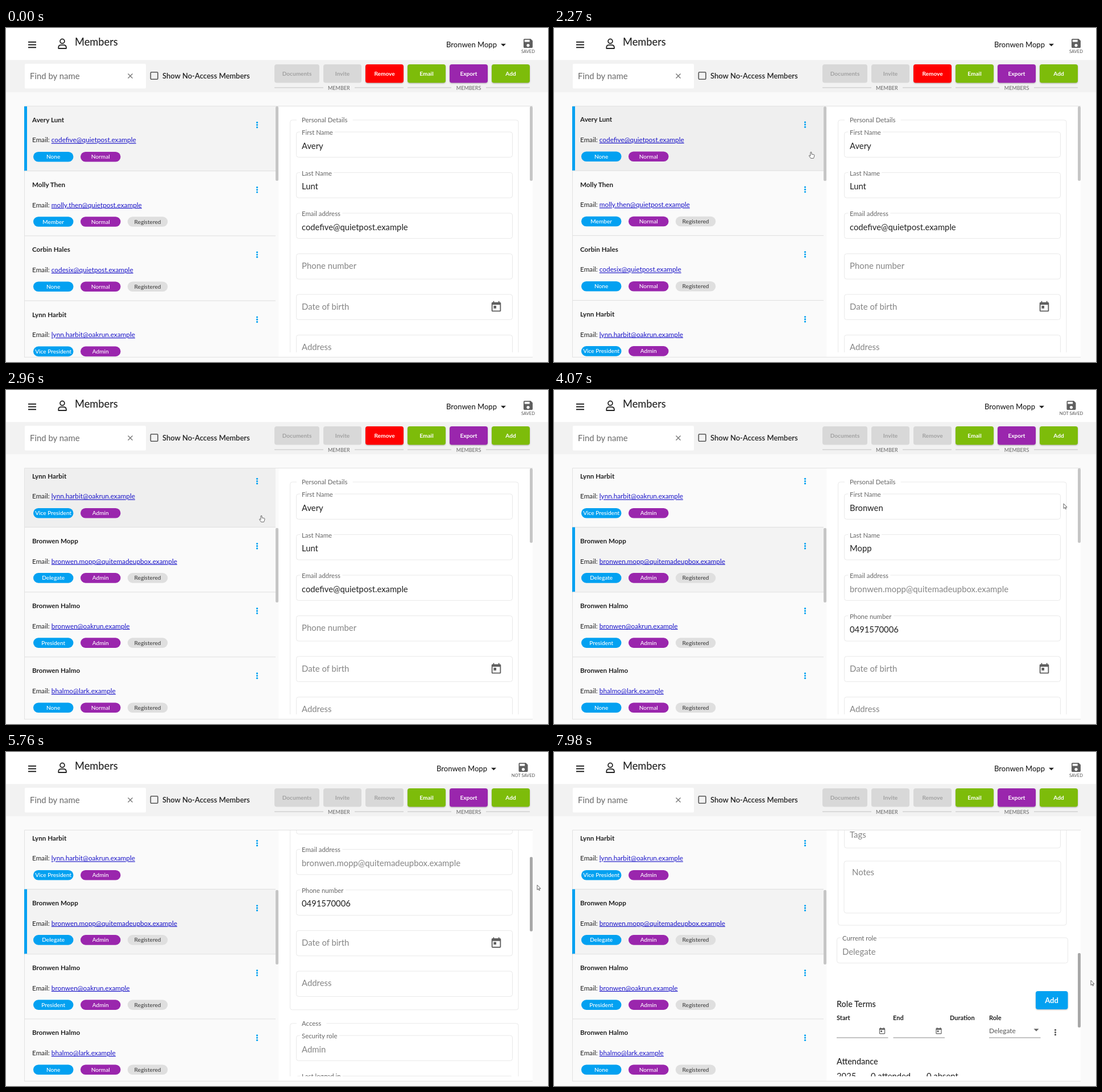
An HTML page for the animation above (8000 ms loop, 953 by 588 pixels).

```html
<!DOCTYPE html>
<html lang="en">
<head>
<meta charset="utf-8">
<title>Members</title>
<style>
html, body { margin: 0; width: 100%; height: 100%; overflow: hidden; background: #fafafa; }
svg { display: block; font-family: Lato, "Open Sans", sans-serif; }
text { fill: #222; white-space: pre; }
.title { font-size: 18.2px; font-weight: 500; }
.user { font-size: 13px; font-weight: 500; }
.check { font-size: 13px; font-weight: 600; }
.btn { font-size: 10.1px; font-weight: 700; text-anchor: middle; }
.caps { font-size: 9px; text-anchor: middle; fill: #666; }
.save { font-size: 7.5px; text-anchor: middle; fill: #555; }
.name { font-size: 11.7px; font-weight: 700; }
.mail { font-size: 11.8px; }
.link { fill: #1a14c8; text-decoration: underline; }
.chip { font-size: 10.1px; font-weight: 500; text-anchor: middle; fill: #fff; }
.value { font-size: 14.8px; }
.hint { font-size: 14.9px; fill: #858585; }
.label, .legend { font-size: 11.4px; fill: #666; stroke: #fff; paint-order: stroke; stroke-linejoin: round; }
.label { stroke-width: 8px; }
.legend { stroke-width: 20px; }
.head { font-size: 14.4px; font-weight: 500; }
.col { font-size: 11px; font-weight: 700; }
.cell { font-size: 11.9px; fill: #555; }
.box { fill: #fff; stroke: #e9e9e9; }
.raised { filter: drop-shadow(0 1px .8px #0004); }
#cursor path { fill: #fff; stroke: #555; stroke-width: .9; stroke-linejoin: round; }
#cursor .beam { fill: none; }
</style>
</head>
<body>
<svg id="stage" width="953" height="588" viewBox="0 0 953 588"></svg>
<script>
const BLUE = '#03a1f1', PURPLE = '#9a26ad', GREEN = '#7dbc0a', GREY = '#d8d8d8', RED = '#ff0000';
const LOOP = 8000, TOP = 137.3, PITCH = 114.2, LIST_SCROLL = 352.7, PICK = 3720, SAVE = 6300;

const text = (x, y, s, cls, style = '') => `<text x="${x}" y="${y}" class="${cls}" style="${style}">${s}</text>`;
const rect = (x, y, w, h, fill, more = '') => `<rect x="${x}" y="${y}" width="${w}" height="${h}" fill="${fill}" ${more}/>`;
const path = (d, stroke, w = 1, more = '') => `<path d="${d}" fill="none" stroke="${stroke}" stroke-width="${w}" ${more}/>`;
const line = (x1, x2, y, stroke = '#dedede') => path(`M${x1} ${y}H${x2}`, stroke);
const caret = (x, y, fill) => `<path d="M${x - 4.5} ${y - 2.3}h9l-4.5 4.6z" fill="${fill}"/>`;
const dots = (x, y, gap, fill) => [-gap, 0, gap].map(d => `<circle cx="${x}" cy="${y + d}" r="1.6" fill="${fill}"/>`).join('');
const icon = (x, y, k, d) => `<path transform="translate(${x} ${y}) scale(${k}) translate(-12 -11.5)" fill="#5f5f5f" d="${d}"/>`;

const FLOPPY = 'M17 3H5c-1.1 0-2 .9-2 2v14c0 1.1.9 2 2 2h14c1.1 0 2-.9 2-2V7zM12 19c-1.7 0-3-1.3-3-3s1.3-3 3-3 3 1.3 3 3-1.3 3-3 3zm3-10H5V5h10z';
const CALENDAR = 'M19 3h-1V1h-2v2H8V1H6v2H5c-1.1 0-2 .9-2 2v14c0 1.1.9 2 2 2h14c1.1 0 2-.9 2-2V5c0-1.1-.9-2-2-2zm0 16H5V8h14zM7 10h5v5H7z';

const members = [
  ['Avery Lunt', 'codefive@quietpost.example', 'None', 'Normal'],
  ['Molly Then', 'molly.then@quietpost.example', 'Member', 'Normal', 1],
  ['Corbin Hales', 'codesix@quietpost.example', 'None', 'Normal', 1],
  ['Lynn Harbit', 'lynn.harbit@oakrun.example', 'Vice President', 'Admin'],
  ['Bronwen Mopp', 'bronwen.mopp@quitemadeupbox.example', 'Delegate', 'Admin', 1],
  ['Bronwen Halmo', 'bronwen@oakrun.example', 'President', 'Admin', 1],
  ['Bronwen Halmo', 'bhalmo@lark.example', 'None', 'Normal', 1]
];

function button(x, w, s, fill, id = '') {
  const off = fill === GREY;
  return `<g id="${id}">` + rect(x, 64, w, 32.5, fill, `rx="4" class="${off ? '' : 'raised'}"`) +
    text(x + w / 2, 84, s, 'btn', `fill:${off ? '#a2a2a2' : '#fff'}`) + '</g>';
}

function chip(x, s, fill, ink = '#fff') {
  return rect(x, 80.7, 70.5, 17.6, fill, 'rx="8.8"') + text(x + 35.2, 93, s, 'chip', `fill:${ink}`);
}

function row([name, mail, role, access, registered], i) {
  return `<g class="row" transform="translate(0 ${TOP + PITCH * i})">` +
    rect(33, 0, 441, PITCH, '#fafafa') + line(33, 474, .2) + rect(32, .2, 5, PITCH - .2, BLUE) +
    text(46, 28.7, name, 'name') +
    text(46, 64.2, `Email: <tspan class="link">${mail}</tspan>`, 'mail') +
    chip(48, role, BLUE) + chip(131, access, PURPLE) +
    (registered ? chip(213.8, 'Registered', '#dfdfdf', '#444') : '') +
    dots(441.5, 33.3, 4.2, BLUE) + '</g>';
}

// An outlined input; without a value the label is shown as a placeholder.
function field(y, label, value, grey, x = 510, w = 380, cls = '') {
  return rect(x + .5, y, w, 44.5, '#fff', `rx="4" class="box ${cls}"`) + (value
    ? text(x + 10, y + 5, label, 'label') + text(x + 10, y + 29.5, value, grey ? 'hint' : 'value')
    : text(x + 10, y + 26.5, label, 'hint'));
}

const group = (y, end, s) => rect(499.5, y, 401.5, end - y, '#fff', 'rx="4" class="box"') + text(520, y + 4, s, 'legend');

function details(id, first, last, mail, greyMail, phone) {
  return `<g id="${id}">` + field(183, 'First Name', first, 0, 510, 380, 'first') + field(254.5, 'Last Name', last) +
    field(326, 'Email address', mail, greyMail) + field(397.5, 'Phone number', phone) + '</g>';
}

const form =
  group(162, 608.5, 'Personal Details') +
  details('before', 'Avery', 'Lunt', members[0][1], 0, '') +
  details('after', 'Bronwen', 'Mopp', members[4][1], 1, '0491570006') +
  field(469, 'Date of birth') + icon(862, 490.5, .92, CALENDAR) + field(540.5, 'Address') +
  group(632.5, 792.5, 'Access') + field(653.7, 'Security role', 'Admin', 1) +
  field(725, 'Last logged in', '4 Jun 2025 3:22 PM', 1) +
  group(817, 1019, 'Other') + field(838.5, 'Tags') +
  rect(510, 906, 381, 91.5, '#fff', 'rx="4" class="box"') + text(524, 930.5, 'Notes', 'hint') +
  field(1041, 'Current role', 'Delegate', 1, 497, 406) +
  text(497, 1163, 'Role Terms', 'head') +
  rect(847, 1135, 56.5, 32, BLUE, 'rx="4" class="raised"') +
  text(875, 1155.5, 'Add', 'btn', 'fill:#fff;font-size:13px') +
  [[497, 'Start'], [596, 'End'], [696, 'Duration'], [765, 'Role']].map(([x, s]) => text(x, 1186, s, 'col')).join('') +
  [497, 596.5, 765].map(x => line(x, x + 90.5, 1217, '#888')).join('') +
  icon(577, 1205, .57, CALENDAR) + icon(676.5, 1205, .57, CALENDAR) +
  text(765, 1208.5, 'Delegate', 'cell') + caret(848, 1203.5, '#666') + dots(881.5, 1207.5, 4.2, '#555') +
  text(497, 1264, 'Attendance', 'head') +
  [[497, '2025'], [557, '0 attended'], [655, '0 absent']].map(([x, s]) => text(x, 1290, s, 'value')).join('');

const $ = id => document.getElementById(id);
$('stage').innerHTML =
  `<clipPath id="listClip">${rect(32, 138, 442, 441)}</clipPath>
   <clipPath id="formClip">${rect(480, 138, 441, 433)}</clipPath>` +
  rect(0, 0, 953, 588, '#fafafa') + rect(0, 0, 953, 56.5, '#fff') + rect(0, 56.5, 953, 56.5, '#f2f2f2') +
  path('M39 24.8h14M39 29.5h14M39 34.2h14', '#222', 2) +
  `<circle cx="99" cy="23.3" r="3.9" fill="none" stroke="#222" stroke-width="1.8"/>` +
  path('M92.3 36v-1.8c0-3.2 2.2-4.4 5-4.4h3.6c2.8 0 5 1.2 5 4.4V36z', '#222', 1.8, 'stroke-linejoin="round"') +
  text(121, 31, 'Members', 'title') +
  '<g id="user">' + text(863, 34, 'Bronwen Mopp', 'user', 'text-anchor:end') + caret(874.5, 30, '#222') + '</g>' +
  '<g id="save">' + icon(918, 26.6, .89, FLOPPY) + text(918, 44.3, '', 'save') + '</g>' +
  rect(33, 63, 213, 43.5, '#fff', 'rx="2"') + text(42, 89.5, 'Find by name', 'hint', 'fill:#6a6a6a') +
  path('M214.5 80.5l8 8m0-8l-8 8', '#777', 1.4) +
  rect(254.3, 77.7, 12.6, 12.6, 'none', 'rx="1.5" stroke="#555" stroke-width="1.6"') +
  text(275, 89, 'Show No-Access Members', 'check') +
  button(472, 79, 'Documents', GREY) + button(558, 67, 'Invite', GREY) +
  button(632, 67, 'Remove', RED, 'remove') + button(632, 67, 'Remove', GREY, 'removeOff') +
  button(706, 67, 'Email', GREEN) + button(780, 67, 'Export', PURPLE) + button(854, 67, 'Add', GREEN) +
  [[472, 558], [613, 699], [706, 783], [844, 921]].map(([a, b]) => line(a, b, 105, '#c2c2c2')).join('') +
  text(585.3, 108.6, 'MEMBER', 'caps') + text(813.6, 108.6, 'MEMBERS', 'caps') +
  rect(479.5, 138, 446.5, 441.5, '#fff') +
  path('M32.5 579.5V137.5H926M32 579.5H926', '#e2e2e2') +
  `<g clip-path="url(#listClip)"><g id="list">${members.map(row).join('')}</g></g>` +
  `<g clip-path="url(#formClip)"><g id="form">${form}</g></g>` +
  rect(474, 138, 5, 131, '#c6c6c6', 'rx="2" id="listThumb"') +
  rect(921, 138, 5, 131, '#c6c6c6', 'rx="2" id="formThumb"') +
  `<g id="cursor">
    <path class="arrow" d="M0 0V8.6L2 6.8 3.4 9.8 4.6 9.2 3.3 6.3H6Z"/>
    <path class="hand" d="M-1 .8Q0-.6 1 .8V4L5 4.8Q6 5 6 6.2L5.2 9.5 4.4 11.3H-.4L-3.4 7.2Q-3.6 5.8-2.4 6.2L-1 7.2Z"/>
    <path class="beam" d="M-2-5.5H2M0-5.5V5.5M-2 5.5H2"/>
  </g>`;

const rows = [...document.querySelectorAll('.row')];
const firstBoxes = document.querySelectorAll('.first');
const pointers = ['arrow', 'hand', 'beam'].map(c => document.querySelector('#cursor .' + c));

// Pointer keys: time, x, y, form scroll.
const keys = [
  [1070, 760, 206, 0], [1320, 700, 208, 0], [1480, 700, 208, 0], [1790, 464, 206, 0], [1940, 464, 206, 0],
  [2250, 452, 218, 0], [2960, 449, 221, 0], [3100, 449, 221, 0], [3550, 446, 300, 0], [3680, 446, 300, 0],
  [4060, 896, 200, 0], [4200, 896, 200, 0], [4300, 935, 186, 0], [4440, 935, 186, 0], [4630, 925, 185, 0],
  [4780, 925, 184, 0], [5110, 925, 184, 0], [5760, 934, 234, 154.4], [6950, 946, 310, 410], [7980, 944, 402, 714]
];

function pose(t) {
  if (t <= keys[0][0]) return keys[0].slice(1);
  const i = keys.findIndex(k => k[0] > t);
  if (i < 0) return keys[keys.length - 1].slice(1);
  const a = keys[i - 1], b = keys[i], u = (t - a[0]) / (b[0] - a[0]);
  return [1, 2, 3].map(n => a[n] + (b[n] - a[n]) * u);
}

function smooth(t, from, to) {
  const u = Math.min(1, Math.max(0, (t - from) / (to - from)));
  return u * u * (3 - 2 * u);
}

const show = (el, on) => el.style.display = on ? '' : 'none';
const move = (id, x, y) => $(id).setAttribute('transform', `translate(${x} ${y})`);

function draw(t) {
  const [x, y, formScroll] = pose(t);
  const listScroll = LIST_SCROLL * smooth(t, 2257, 2890);
  const visible = t >= keys[0][0], picked = t >= PICK, unsaved = picked && t < SAVE;
  const overList = visible && x < 474;
  const overFirst = visible && x > 510 && x < 890 && y > 183 && y < 227;
  const hovered = overList ? Math.floor((y - TOP + listScroll) / PITCH) : -1;
  const selected = picked ? 4 : 0;

  move('list', 0, -listScroll);
  move('form', 0, -formScroll);
  move('listThumb', 0, listScroll * .298);
  move('formThumb', 0, formScroll * .3025);
  $('formThumb').setAttribute('fill', t >= 4460 ? '#a8a8a8' : '#c6c6c6');

  rows.forEach((r, i) => {
    const [back, bar] = r.querySelectorAll('rect');
    back.setAttribute('fill', i === hovered ? '#efefef' : i === selected ? '#f3f3f3' : '#fafafa');
    show(bar, i === selected);
  });
  firstBoxes.forEach(b => b.style.stroke = overFirst ? '#777' : '');

  show($('before'), !picked);
  show($('after'), picked);
  show($('remove'), !picked);
  show($('removeOff'), picked);
  move('user', unsaved ? -17 : 0, 0);
  move('save', unsaved ? -8.5 : 0, 0);
  $('save').querySelector('text').textContent = unsaved ? 'NOT SAVED' : 'SAVED';

  show($('cursor'), visible);
  move('cursor', x, y);
  const kind = overList ? 1 : overFirst ? 2 : 0;
  pointers.forEach((p, i) => show(p, i === kind));
}

const start = performance.now();
function tick() {
  draw((performance.now() - start) % LOOP);
  requestAnimationFrame(tick);
}
tick();
</script>
</body>
</html>
```
